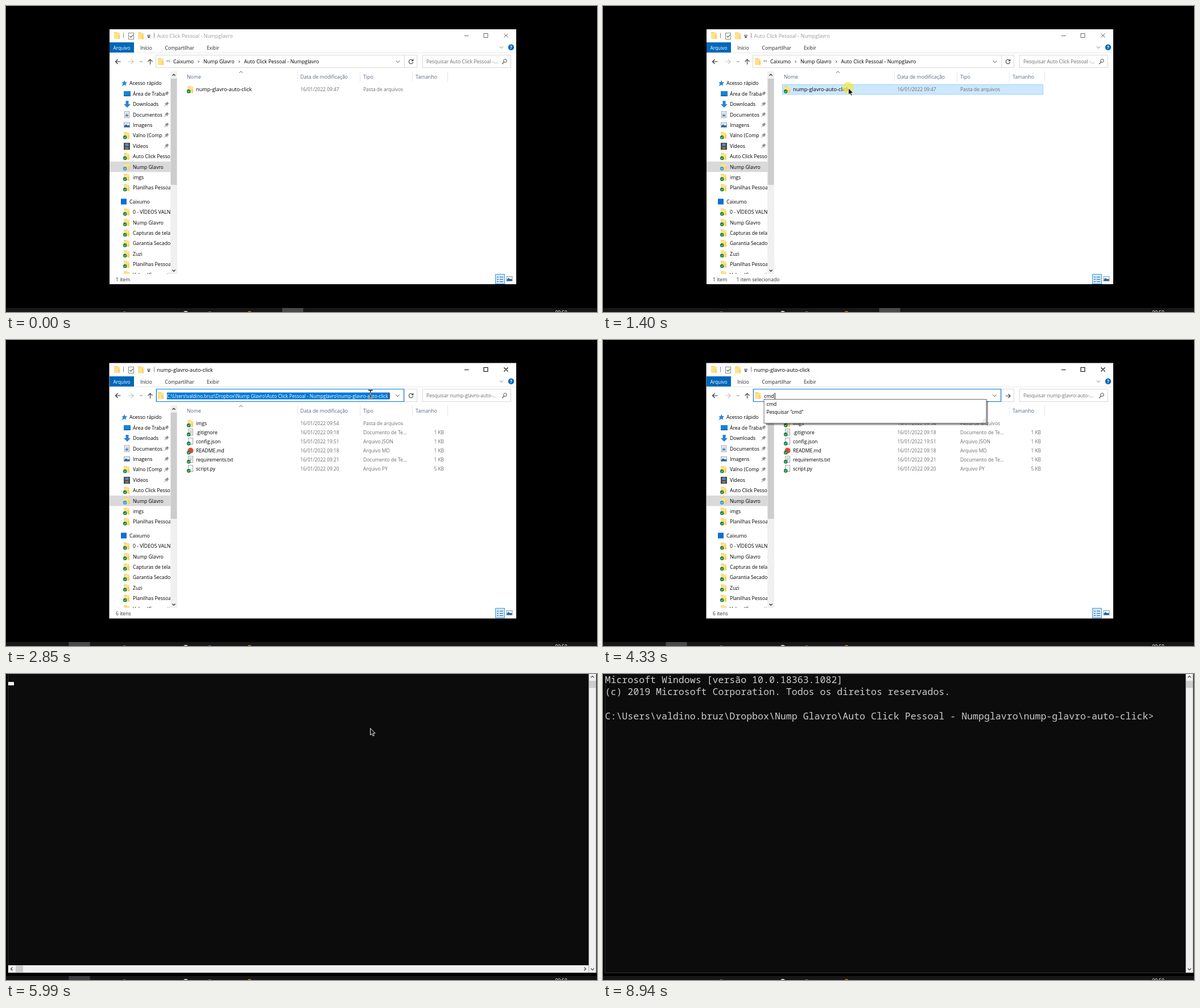
An HTML page that plays this animation: 1039 px wide and 539 px high, repeating every 9010 ms.

```html
<!DOCTYPE html>
<html lang="pt-BR">
<head>
<meta charset="utf-8">
<title>Abrir o prompt pela barra de endereço</title>
<style>
html, body { margin: 0; width: 100%; height: 100%; overflow: hidden; background: #000; }
svg { display: block; width: 100%; height: 100%; }
text { font-family: "Open Sans", "Noto Sans", sans-serif; white-space: pre; }
#con text { font: 16.58px "Noto Sans Mono", "DejaVu Sans Mono", monospace; }
#beam { mix-blend-mode: difference; }
</style>
</head>
<body>
<svg id="stage" viewBox="0 0 1039 539"></svg>
<script>
const LOOP = 9010, TICK = 67.2;
const BLUE = '#0067b8', GREY = '#6d6d6d', HEAD = '#566a82';
const GAME = 'Nump Glavro', FOLDER = 'Auto Click Pessoal - Numpglavro', REPO = 'nump-glavro-auto-click';
const CLOUD = 'Caixumo';
const PATH = String.raw`C:\Users\valdino.bruz\Dropbox\${GAME}\${FOLDER}\${REPO}`
  .replace(/\$\{GAME\}/, GAME);
const FULL = ['C:', 'Users', 'valdino.bruz', 'Dropbox', GAME, FOLDER, REPO].join('\\');

// Drawing helpers, all return SVG markup
const rect = (x, y, w, h, fill, more = '') => `<rect x="${x}" y="${y}" width="${w}" height="${h}" fill="${fill}" ${more}/>`;
const frame = (x, y, w, h, stroke, fill = 'none') => rect(x + .5, y + .5, w - 1, h - 1, fill, `stroke="${stroke}"`);
const disc = (x, y, r, fill, more = '') => `<circle cx="${x}" cy="${y}" r="${r}" fill="${fill}" ${more}/>`;
const line = (d, stroke = '#444', w = 1) => `<path d="${d}" fill="none" stroke="${stroke}" stroke-width="${w}"/>`;
const text = (x, y, s, size = 8.7, fill = '#000', more = '') =>
  `<text x="${x}" y="${y}" font-size="${size}" fill="${fill}" ${more}>${s.replace(/>/g, '&gt;')}</text>`;
const group = (id, body, more = '') => `<g id="${id}" ${more}>${body}</g>`;

// Chevron centred on x,y; dx,dy is the direction of its tip
function chevron(x, y, dx, dy, s = 3, stroke = '#444', w = 1) {
  const h = s / 2;
  const a = dy ? [x - s, y - dy * h] : [x - dx * h, y - s];
  const b = dy ? [x + s, y - dy * h] : [x - dx * h, y + s];
  return line(`M${a} L${x + dx * h} ${y + dy * h} L${b}`, stroke, w);
}
const folder = (x, y) => rect(x, y, 6, 3, '#f2c94f') + rect(x, y + 1, 10, 11, '#ffe18a') +
  rect(x + 7.5, y + 5, 2.5, 7, '#f6cf62');
const badge = (x, y, fill = '#16813a') => disc(x, y, 3.3, fill) +
  line(`M${x - 1.7} ${y} l1.2 1.3 l2.2 -2.5`, '#fff', .9);
const synced = (x, y) => folder(x, y) + badge(x + 2.2, y + 9.2);
const sheet = (x, y, lines = true) => frame(x, y, 9, 12, '#9aa0a6', '#fff') +
  (lines ? line(`M${x + 2} ${y + 3.5} h5 m-5 2 h5 m-5 2 h5`, '#8a97a3', .8) : '');
const photo = (x, y) => frame(x, y, 11, 9, '#8aa0b4', '#e4f1fb') +
  `<path d="M${x + 1} ${y + 6} l3 -3 l2 2 h4 v3 h-9z" fill="#28628f"/>`;
const pin = y => `<g transform="translate(282 ${y}) rotate(45)">${rect(-2, -4, 4, 4, '#8a8f94') +
  rect(-3, 0, 6, 1.2, '#8a8f94') + rect(-.4, 1, .9, 4, '#8a8f94')}</g>`;

function sidebar() {
  const y1 = i => 154.5 + i * 18.4, y2 = i => 363 + i * 18.4;
  const item = (y, s, icon) => icon + text(223, y + 3.2, s);
  const fold = (y, s) => item(y, s, synced(207, y - 6));
  let s = rect(182, 274, 107, 18.5, '#d9d9d9');
  s += `<path d="M208 130.5l1.6 3.4 3.6.4-2.7 2.6.8 3.6-3.3-1.8-4.4 2.6 1.9-4.5-2-2.3 3.5-.4z" fill="#2a88d8"/>`;
  s += text(217, 139.2, 'Acesso rápido');
  s += item(y1(0), 'Área de Traba', rect(207, 150, 12, 9, '#1583d8') + rect(207, 157.5, 12, 1.5, '#0b5ea5'));
  s += item(y1(1), 'Downloads', '<path d="M210.5 167h5v6h3.5l-6 6-6-6h3.5z" fill="#2a83d4"/>');
  s += item(y1(2), 'Documentos', sheet(208, y1(2) - 6) + rect(210, y1(2), 5, 3.5, '#4a90c8'));
  s += item(y1(3), 'Imagens', photo(207, y1(3) - 4.5));
  s += fold(y1(4), 'Valno (Comp');
  s += item(y1(5), 'Vídeos', rect(207, 241, 11, 12, '#2b2f35') + rect(209.5, 242, 6, 5, '#4f8fc0') +
    rect(209.5, 248, 6, 4, '#8c7552') + line('M208.2 242v10M216.8 242v10', '#ccc', .8).replace('/>', ' stroke-dasharray="1 1"/>'));
  for (let i = 0; i < 6; i++) s += pin(y1(i));
  s += fold(y1(6), FOLDER);
  s += item(y1(7), GAME, folder(207, 277) + badge(209.2, 286.4, '#2f9bdc'));
  s += fold(y1(8), 'imgs') + fold(y1(9), 'Planilhas Pessoais');
  s += rect(202, 339.5, 10, 10, '#0b6fd6') + text(217, 347.7, CLOUD);
  ['0 - VÍDEOS VALNO', GAME, 'Capturas de tela', 'Garantia Secadora', 'Zuzi', 'Planilhas Pessoais', 'Valno (Comparti']
    .forEach((n, i) => s += fold(y2(i), n));
  return `<g clip-path="url(#side)">${s}</g>` + rect(289, 115, 12, 357, '#f0f0f0') +
    rect(289.5, 128, 11, 187, '#cdcdcd') + chevron(295, 121.5, 0, -1, 2.6, '#333', 1.3) + chevron(295, 466, 0, 1, 2.6, '#333', 1.3);
}

function chrome() {
  let s = folder(190, 46) + line('M206.5 47.5v9M260.5 47.5v9', '#888');
  s += frame(215, 47, 10, 12, '#888', '#fff') + line('M217.5 53l2 2.2 4-4.5', '#3d7a3d', 1.2) + folder(232, 46.5);
  s += line('M248 51.5h6', '#333') + '<path d="M248 53.5h6l-3 3z" fill="#333"/>';
  s += rect(182, 64, 43, 18, BLUE) + text(188.5, 76.5, 'Arquivo', 8.3, '#fff');
  s += text(236, 76.5, 'Início', 8.4, '#222') + text(279.5, 76.5, 'Compartilhar', 8.3, '#222') + text(353, 76.5, 'Exibir', 8.3, '#222');
  s += chevron(871, 73, 0, 1, 3, '#777') + disc(888, 72.8, 5.2, BLUE) + text(888, 76, '?', 8.5, '#fff', 'text-anchor="middle" font-weight="700"');
  s += rect(225, 82, 672, 1, '#e8e8e8');
  s += line('M201.5 98h-9m4-4l-4 4 4 4', '#333', 1.2) + line('M215 98h9m-4-4l4 4-4 4', '#c4c4c4', 1.2);
  s += chevron(237.5, 98, 0, 1, 2, '#666') + line('M253.5 103v-9m-4 4l4-4 4 4', '#444', 1.2);
  s += frame(263, 86, 460, 23, '#d9d9d9') + folder(267, 92) + frame(732, 86, 156, 23, '#d9d9d9');
  s += line('M700.5 87v21', '#d9d9d9') + chevron(689, 98, 0, 1, 3.3);
  s += disc(877.5, 96.5, 2.8, 'none', 'stroke="#444"') + line('M875.5 98.7l-3.3 3.6', '#444', 1.2);
  return s;
}

function columns() {
  const hs = [[318, 'Nome'], [517.5, 'Data de modificação'], [628, 'Tipo'], [720, 'Tamanho']];
  return group('hover', rect(305, 115, 207, 18.5, '#d9ebf9') + line('M500.5 115v18', '#b5d7ee') + chevron(506, 124.5, 0, 1, 2, '#2a6fa8')) +
    line('M512.5 115v18M622.5 115v18M714.5 115v18M776.5 115v18', '#e5e5e5') +
    hs.map(([x, s]) => text(x, 128, s, 8.75, HEAD)).join('') + chevron(413, 116.5, 0, -1, 3, '#666');
}

function row(i, name, date, kind, size, icon, fs = 8.6) {
  const y = 150.2 + i * 16;
  return icon(319, y - 9) + text(334, y, name, fs) + text(517.5, y, date, 8.4, GREY) +
    text(628, y, kind, 8.5, GREY) + text(770, y, size, 8.4, GREY, 'text-anchor="end"');
}
const crumbs = list => chevron(283.5, 97, -1, 0, 1.6) + chevron(286.7, 97, -1, 0, 1.6) +
  list.map(([x, s], i) => (i ? chevron(x - 8.5, 98, 1, 0, 2) : '') + text(x, 101.2, s, s === REPO ? 9.2 : 8.8)).join('');

function listings() {
  const withBadge = f => (x, y) => f(x, y) + badge(x + 2.2, y + 9.2);
  const doc = withBadge((x, y) => sheet(x + 1, y - 1)), blank = withBadge((x, y) => sheet(x + 1, y - 1, false));
  const web = withBadge((x, y) => disc(x + 5.5, y + 5.5, 5, '#dd4b3a'));
  const note = 'Documento de Te...', refresh = line('M715.2 96.2a3.7 3.7 0 1 0 .4 2.6M715.8 93.6v3h-3', '#444', 1.1);
  const find = s => text(739, 101.2, s, 8.6, GREY);
  const before = text(265.5, 56, FOLDER, 8.9, '#999') + line('M806 52.5h7.5M840 48.5h7v7h-7zM875.5 48.5l7 7m0-7l-7 7', '#666') +
    crumbs([[294, CLOUD], [347, GAME], [418.5, FOLDER]]) + refresh + find('Pesquisar Auto Click Pessoal -...') +
    group('rowHot', rect(315, 138, 459, 18, '#e5f3ff')) + group('picked', frame(315, 138, 459, 18, '#99d1ff', '#cce8ff') +
    text(234.5, 485, '1 item selecionado', 8.7, '#333')) +
    row(0, REPO, '16/01/2022 09:47', 'Pasta de arquivos', '', synced, 9.2) + text(193, 485, '1 item', 8.6, '#333');
  const after = text(265.5, 56, REPO, 9.2) + line('M806 52.5h7.5M840 48.5h7v7h-7zM875.5 48.5l7 7m0-7l-7 7', '#000', 1.1) +
    group('trail', crumbs([[294, GAME], [366, FOLDER], [517, REPO]])) + group('reload', refresh) + find('Pesquisar nump-glavro-auto-...') +
    row(0, 'imgs', '16/01/2022 09:54', 'Pasta de arquivos', '', synced) +
    row(1, '.gitignore', '16/01/2022 09:18', note, '1 KB', doc) +
    row(2, 'config.json', '15/01/2022 19:51', 'Arquivo JSON', '1 KB', blank) +
    row(3, 'README.md', '16/01/2022 09:18', 'Arquivo MD', '1 KB', web) +
    row(4, 'requirements.txt', '16/01/2022 09:21', note, '1 KB', doc, 8.4) +
    row(5, 'script.py', '16/01/2022 09:20', 'Arquivo PY', '5 KB', blank) + text(193, 485, '6 itens', 8.6, '#333');
  return group('before', before) + group('after', after);
}

function address() {
  const grip = [[671, 140], [671, 143], [668, 143], [671, 146], [668, 146], [665, 146]].map(([x, y]) => rect(x, y - 1, 1.3, 1.3, '#999')).join('');
  return group('edit', frame(264, 86, 436, 23, '#0078d7', '#fff') + folder(267, 92) + chevron(688.5, 98, 0, 1, 3.3) +
    group('marked', rect(283, 92.5, 391, 12, '#0078d7') + text(283, 101.6, FULL, 8.2, '#fff')) +
    '<text id="typed" x="283" y="101.6" font-size="8.8"></text>') +
    group('go', line('M708 98.5h8m-3.5-3.5l3.5 3.5-3.5 3.5', '#444', 1.2)) +
    group('popup', rect(286, 107, 391, 43, '#000', 'opacity=".35"') + frame(282.5, 104, 392, 43, '#6a6a6a', '#fff') +
      '<text id="hint" x="287.5" y="116" font-size="8.8"></text><text id="seek" x="287.5" y="129.5" font-size="8.6"></text>' + grip) +
    rect(0, 93, 1, 11, '#000', 'id="caret"');
}

function prompt() {
  const out = [[15.5, 'Microsoft Windows [versão 10.0.18363.1082]'], [37, '(c) 2019 Microsoft Corporation. Todos os direitos reservados.'], [80, FULL + '>']];
  return rect(0, 0, 1039, 532, '#000') + frame(3, -2, 1036, 529, '#333', '#0c0c0c') +
    rect(1024.5, 0, 13, 526, '#f0f0f0') + rect(1025, 12, 12, 12.5, '#cdcdcd') +
    chevron(1031, 5, 0, -1, 2.8, '#444', 1.3) + chevron(1031, 520, 0, 1, 2.8, '#444', 1.3) +
    group('hbar', rect(4, 513, 1020.5, 13, '#f0f0f0') + rect(17, 513.5, 13, 12, '#cdcdcd') +
      chevron(10, 519.5, -1, 0, 2.8, '#444', 1.3) + chevron(1018, 519.5, 1, 0, 2.8, '#444', 1.3)) +
    group('output', out.map(([y, s]) => text(3.5, y, s, 16.58, '#ccc')).join('')) + rect(4, 14, 10, 6, '#f2f2f2', 'id="block"');
}

document.getElementById('stage').innerHTML =
  `<clipPath id="side"><rect x="182" y="115" width="107" height="357"/></clipPath>` + rect(0, 0, 1039, 539, '#000') +
  group('win', rect(182, 41, 715, 449, '#fff', 'id="pane"') + chrome() + sidebar() + columns() + listings() +
    frame(860, 472, 17, 18, '#3c9be0', '#cce8ff') + line('M863 477.5h3m2 0h6M863 481.5h3m2 0h6M863 485.5h3m2 0h6', '#44637c') +
    photo(879.5, 476) + address()) +
  group('con', prompt()) +
  rect(0, 532, 1039, 7, '#191617') + rect(0, 532, 37, 7, '#4a484d', 'id="task"') +
  disc(208, 542, 4, '#777') + disc(316, 542, 5, '#b9d8cf') + disc(358, 542, 4, '#5d8fae') + disc(428, 542, 4.5, '#d98a1c') +
  text(965.5, 543.3, '09:50', 8.4, '#fff') +
  disc(0, 0, 10, '#f2ea3c', 'id="halo" opacity=".72"') +
  group('arrow', '<path d="M.5.5V12.6l2.8-2.5 1.9 4.1 2-.9-1.8-4H9z" fill="#111" stroke="#fff" stroke-width=".9"/>') +
  group('beam', line('M637 88.5h2.8l1 1 1-1h2.8M640.8 89.5v12M637 102.5h2.8l1-1 1 1h2.8', '#fff', 1.3));

const el = {};
document.querySelectorAll('[id]').forEach(n => el[n.id] = n);
const show = (id, on) => el[id].style.display = on ? '' : 'none';
const within = (t, ...spans) => spans.some(([a, b]) => t >= a && t < b);
const put = (id, at) => Object.entries(at).forEach(([k, v]) => el[id].setAttribute(k, v));

// Mouse track: time, x, y
const track = [[260, 925, 478], [530, 760, 300], [730, 545, 158], [805, 490, 124], [940, 431, 144],
  [1680, 431, 144], [1950, 532, 113], [2300, 624, 100], [2580, 640, 95], [7670, 640, 95], [8070, 880, 458]];
function mouse(t) {
  const q = Math.floor((t + 10) / TICK) * TICK;
  let i = 1;
  while (i < track.length - 1 && q > track[i][0]) i++;
  const [t0, x0, y0] = track[i - 1], [t1, x1, y1] = track[i];
  const p = Math.min(1, Math.max(0, (q - t0) / (t1 - t0)));
  return [x0 + (x1 - x0) * p, y0 + (y1 - y0) * p];
}

const entry = t => t < 3910 ? '' : t < 4050 ? 'c' : t < 4190 ? 'cm' : t < 5850 ? 'cmd' : 'C:\\Windows\\System32\\cmd.exe';
const caretAt = { '': 673.5, c: 287.5, cm: 295.7, cmd: 301.7 };

function draw(t) {
  const open = t >= 1680, con = t >= 5990, [mx, my] = mouse(t);
  show('win', !con);
  show('con', con);
  put('pane', open ? { x: 181.5, y: 40.5, width: 715.5, height: 450 } : { x: 182, y: 41, width: 715, height: 449 });
  show('before', !open);
  show('after', open);
  show('picked', t >= 1400);
  show('rowHot', within(t, [260, 1400]) && mx < 773 && my > 138 && my < 156);
  show('hover', within(t, [740, 870], [1880, 2030]));

  const word = entry(t), typing = t >= 3910;
  show('edit', t >= 2720);
  show('marked', !typing);
  show('trail', t < 2720);
  show('reload', !typing);
  show('go', typing);
  show('popup', within(t, [3980, 5720]));
  el.typed.textContent = el.hint.textContent = word;
  el.seek.textContent = `Pesquisar "${word}"`;
  show('caret', within(t, [2850, 3380], [3910, 4860], [5390, 5990]));
  put('caret', { x: caretAt[word] || 283 });

  const ready = t >= 6120;
  show('hbar', t < 6055);
  show('output', ready);
  show('block', within(t, [5990, 7000], [7530, 8070], [8600, 8940]));
  put('block', ready ? { x: 969, y: 79, height: 5 } : { x: 4, y: 14, height: 6 });

  show('task', t < 8940);
  put('task', { x: open ? 110.5 : 485.5, opacity: con ? .8 : 1 });
  show('arrow', within(t, [260, 2720], [5990, 8140]));
  put('arrow', { transform: `translate(${mx} ${my})` });
  show('beam', within(t, [2720, 3910], [5850, 5990]));
  show('halo', within(t, [1400, 1480], [1540, 1610], [2720, 2850]));
  put('halo', { cx: mx, cy: my });
}

const start = performance.now();
(function tick() {
  draw((performance.now() - start) % LOOP);
  requestAnimationFrame(tick);
})();
</script>
</body>
</html>
```
